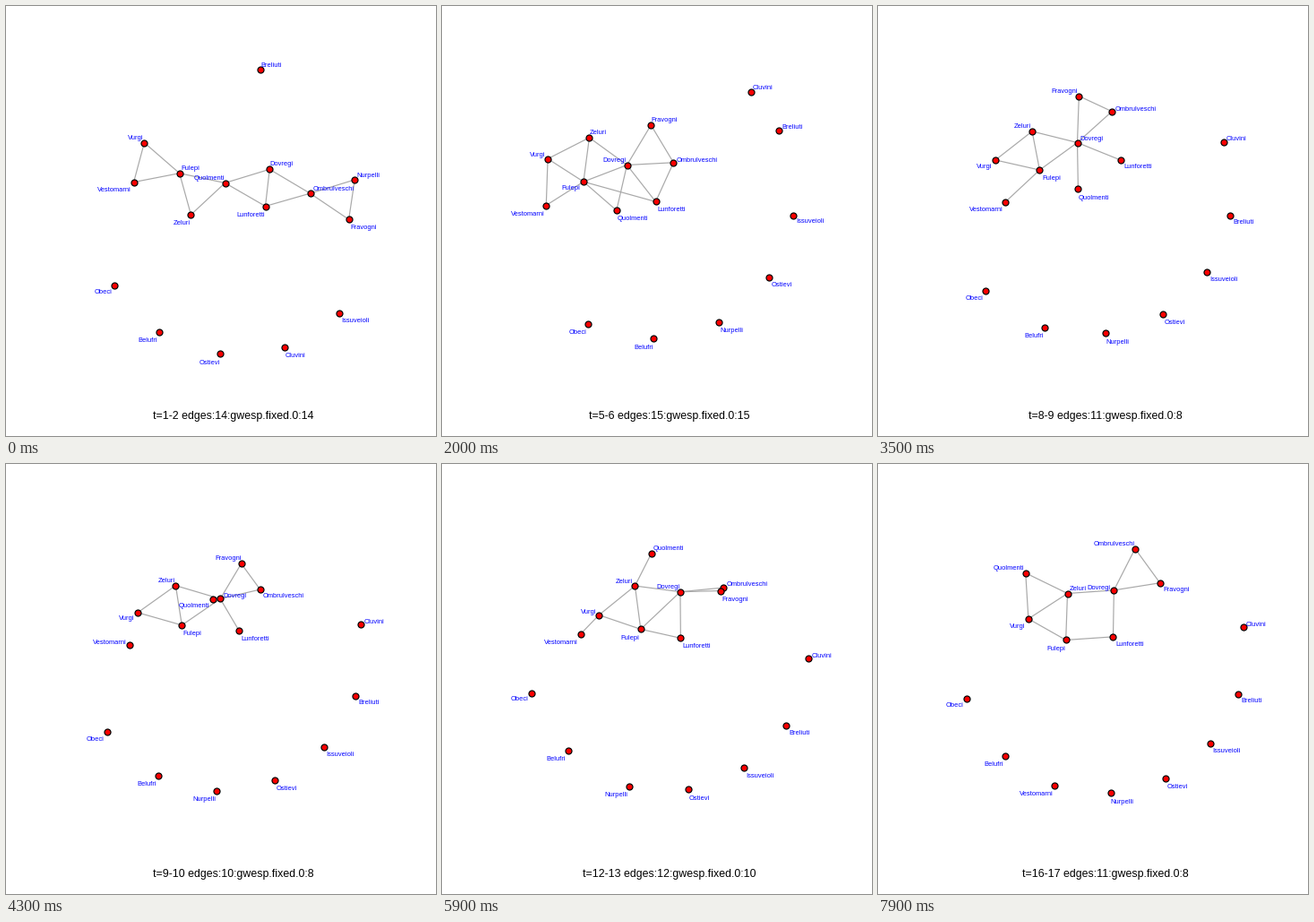
Write a matplotlib script that moves like this. It is 480 by 480 pixels and loops after 8000 ms.

```python
import numpy as np
import matplotlib.pyplot as plt
from matplotlib.animation import FuncAnimation
from matplotlib.collections import LineCollection

SIZE, DPI = 480, 100
PX = 72 / DPI          # one pixel in points
TWEEN = 5              # frames per time slice
HOLD = 4               # extra frames on the opening pose
FRAMES = 80
LINK = 52              # length of a link
RING = 160             # radius of the circle of unlinked nodes
DOT = 3.5

NAMES = ("Breliuti Vurgi Fulepi Vestomarni Quolmenti Zeluri Dovregi Lunforetti "
         "Ombrulveschi Nurpelli Fravogni Obeci Issuveioli Belufri Ostievi "
         "Cluvini").split()
CODES = [name[:2] for name in NAMES]


def ease(n):
    """Slice position at step n, eased within each slice."""
    k, j = divmod(n, TWEEN)
    s = j / TWEEN
    return k + s * s * (3 - 2 * s)


def slice_of(n):
    return -(-n // TWEEN)


def polar(radius, degrees):
    a = np.radians(float(degrees))
    return radius * np.array([np.cos(a), np.sin(a)])


times, poses, known = [], [], {}


def pose(n, center, ring, web, **points):
    """Key pose at step n.

    ring: nodes around the circle; those without an angle are spaced evenly.
    web: links; a link with a heading also places its second node.
    points: nodes at a fixed place.
    """
    at = {c: np.array(p, float) for c, p in points.items()}

    ring = ring.split()
    pins = [(i, float(w[2:])) for i, w in enumerate(ring) if w[2:]]
    angles = np.interp(range(len(ring)), *zip(*pins))
    for w, angle in zip(ring, angles):
        at[w[:2]] = center + polar(RING, angle)

    edges = []
    for w in web.split():
        a, b, heading = w[:2], w[2:4], w[4:]
        if heading:
            at[b] = at[a] + polar(LINK, heading)
        edges.append(tuple(sorted((CODES.index(a), CODES.index(b)))))

    times.append(ease(n))
    poses.append(np.array([at[c] for c in CODES]))
    known[slice_of(n)] = edges


pose(0, (259, 230), "Br-81 Is45 Cl Os Be Ob149",
     "NuFr QuFu192 QuZe137 FuVu221 FuVe169 VuVe FuZe QuDo-17 QuLu30 DoLu "
     "LuOm-16 DoOm OmNu-17 OmFr34", Qu=(245, 198))
pose(9, (243, 229), "Br-74 Is10 Os60 Be Ob131",
     "VuZe BrCl DoLu85 DoOm23 DoZe222 DoQu144 QuFu218 FuVu264 FuVe199 VuVe "
     "FuZe LuOm OmNu-29 OmFr47 QuLu", Do=(233, 208), Cl=(328, 126))
pose(16, (234, 212), "Cl-46 Br-27 Is8 Os Nu Be Ob116",
     "DoFr-59 DoZe216 DoFu159 DoOm-3 DoQu103 DoLu52 ZeVu153 VuVe92 VuFu VeFu "
     "ZeFu FuQu FuLu LuOm FrOm", Do=(207, 178))
pose(31, (236, 207), "Cl-20 Br10 Is Os Nu Be108 Ob136",
     "DoFr-88 DoOm-42 DoLu22 DoQu89 DoFu144 DoZe194 ZeVu142 FuVe137 ZeFu VuFu "
     "FrOm", Do=(223, 153))
pose(48, (247, 207), "Cl0 Br29 Is Os Nu Be125 Ob152",
     "DoQu-110 DoZe199 DoFu147 DoLu96 DoFr-31 DoOm15 ZeVu147 VuVe QuZe ZeFu "
     "VuFu FuLu FrOm", Do=(256, 149), Ve=(135, 187))
pose(62, (254, 205), "Cl8 Br37 Is Os Nu109 Be142 Ob171",
     "LuFr ZeDo-4 ZeVu135 ZeFu82 DoLu83 DoFr28 DoOm-26 ZeQu VuFu FuLu OmFr",
     Ze=(225, 141), Qu=(230, 101), Ve=(175, 194))
pose(75, (250, 208), "Cl-9 Br18 Is Os Nu Ve Be132 Ob160",
     "ZeQu206 ZeVu147 ZeFu92 ZeDo-4 DoLu91 DoOm-63 DoFr-9 QuVu VuFu FuLu OmFr",
     Ze=(212, 145))


def blend(u):
    i = min(max(np.searchsorted(times, u) - 1, 0), len(times) - 2)
    f = (u - times[i]) / (times[i + 1] - times[i])
    return poses[i] + f * (poses[i + 1] - poses[i])


def edges_at(k):
    """Links of slice k; changes between known slices come one after another."""
    a = max(s for s in known if s <= k)
    b = min(s for s in known if s >= k)
    if a == b:
        return known[a]
    gone = [e for e in known[a] if e not in known[b]]
    new = [e for e in known[b] if e not in known[a]]
    order = []
    for i in range(max(len(gone), len(new))):
        order += gone[i:i + 1] + new[i:i + 1]
    done = order[:round(len(order) * (k - a) / (b - a))]
    return ([e for e in known[a] if e not in done]
            + [e for e in new if e in done])


def neighbours(edges):
    near = [set() for _ in NAMES]
    for a, b in edges:
        near[a].add(b)
        near[b].add(a)
    return near


def unit(v):
    return v / max(np.hypot(*v), 1e-9)


def away(i, pos, near):
    """Direction for a label: off the links, or off the middle."""
    if near[i]:
        return unit(sum(unit(pos[i] - pos[j]) for j in near[i]))
    return unit(pos[i] - pos.mean(axis=0))


plt.rcParams["font.family"] = "Liberation Sans"
fig = plt.figure(figsize=(SIZE / DPI, SIZE / DPI), dpi=DPI, facecolor="white")
ax = fig.add_axes([0, 0, 1, 1])
ax.set_xlim(0.5, SIZE + 0.5)
ax.set_ylim(SIZE + 0.5, 0.5)
ax.axis("off")

lines = LineCollection([], colors="#a9a9a9", linewidths=1.2 * PX, zorder=1)
ax.add_collection(lines)
dots, = ax.plot([], [], "o", ms=7 * PX, mfc="red", mec="black", mew=1.2 * PX,
                antialiased=False, zorder=2)
labels = [ax.text(0, 0, name, color="blue", fontsize=7.45 * PX, va="baseline",
                  zorder=3) for name in NAMES]
caption = ax.text(254, 462, "", fontsize=12.4 * PX, ha="center", va="baseline")


def draw(frame):
    n = max(0, frame - HOLD)
    k = slice_of(n)
    pos, edges = blend(ease(n)), edges_at(k)
    near = neighbours(edges)

    lines.set_segments([pos[[a, b]] for a, b in edges])
    dots.set_data(pos[:, 0], pos[:, 1])
    for i, label in enumerate(labels):
        v = away(i, pos, near)
        x, y = pos[i] + v * DOT
        label.set_ha("left" if v[0] > 0 else "right")
        label.set_position((x, y + (8 if v[1] > 0 else -0.5)))

    shared = sum(bool(near[a] & near[b]) for a, b in edges)
    caption.set_text(f"t={k + 1}-{k + 2} edges:{len(edges)}:gwesp.fixed.0:{shared}")
    return [lines, dots, caption, *labels]


anim = FuncAnimation(fig, draw, frames=FRAMES, interval=100, repeat=True,
                     repeat_delay=0, blit=False)
plt.show()
```
